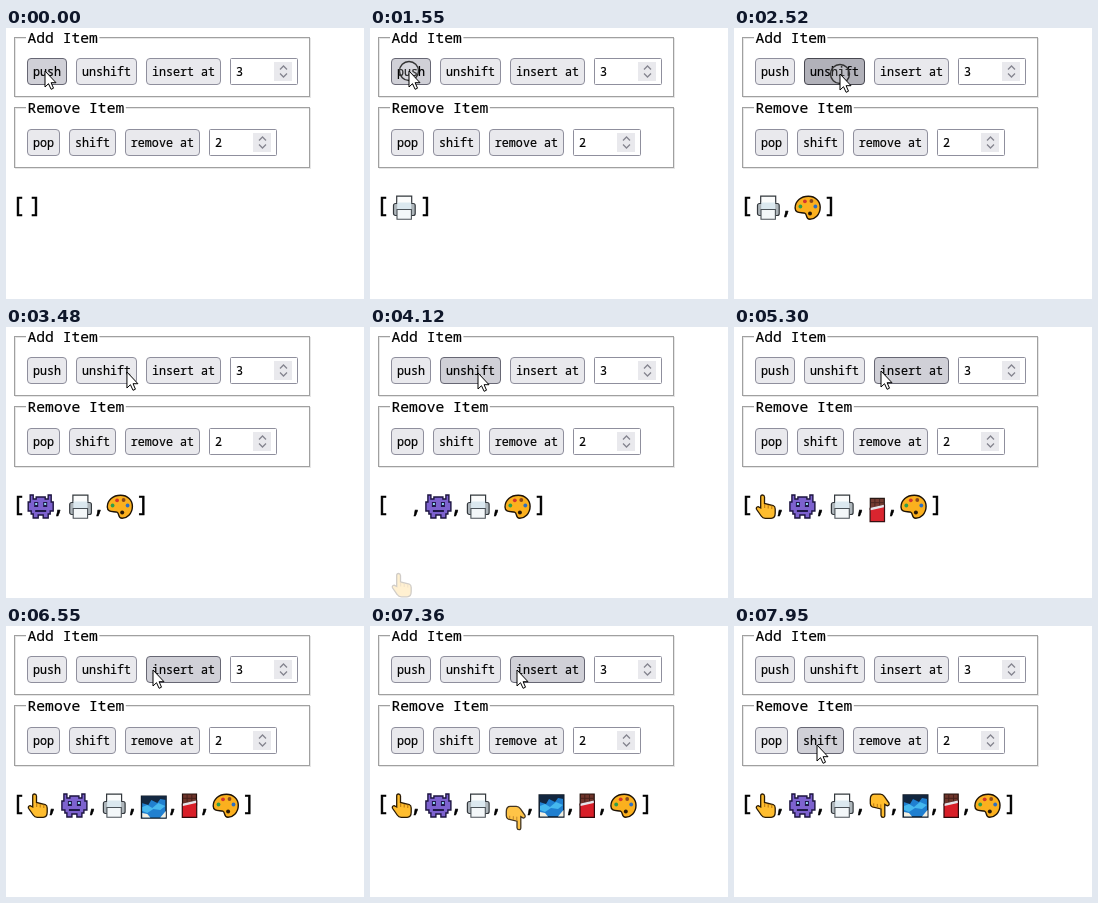
Animation of 358 by 271 pixels, one loop 8000 ms. Source, as an HTML page:

```html
<!DOCTYPE html>
<html lang="en">
<head>
<meta charset="utf-8">
<title>Array methods</title>
<style>
html, body { margin: 0; width: 100%; height: 100%; overflow: hidden; background: #fff; }
svg { display: block; }
text { font: 14.67px "Noto Sans Mono", monospace; fill: #000; stroke: #000; stroke-width: .2px; }
.small { font-size: 11.7px; }
.list text { font-size: 22px; stroke-width: .5px; }
.btn { fill: #e9e9ed; stroke: #8f8f9d; }
.btn.hover { fill: #d0d0d7; stroke: #676774; }
.btn.active { fill: #b1b1b9; stroke: #484851; }
</style>
</head>
<body>
<svg width="358" height="271" viewBox="0 0 358 271">
  <g id="form"></g>
  <g id="list" class="list"></g>
  <circle id="ring" r="9.5" fill="#fff" fill-opacity=".15" stroke="#333" stroke-width="1.4"/>
  <path id="cursor" d="M0 0V16L3.5 12.7 6.1 18.3 8.5 17.2 6.1 11.7H11Z" fill="#fff" stroke="#000"/>
</svg>
<script>
const LOOP = 8000, FLY = 400, CHAR = 13.2;
const $ = id => document.getElementById(id);

// Each icon: advance width and drawing
const hand = `<path d="M5.5 12V3Q5.5 1 7.3 1T9.3 3V9.5L18 11.5Q20 12.3 20 15V19Q20 24.3 16 24.3H10Q7.5 24.3 6 22L1.3 15.3Q.5 13 3 12.6L5.5 14Z"
  fill="#ffbd2e" stroke="#2a1a04" stroke-width="1.3"/><path d="M9.5 10V14M13 11V14.5M16.6 11.6V15" fill="none" stroke="#b87510"/>`;
const dot = (x, y, c, r = 1.9) => `<circle cx="${x}" cy="${y}" r="${r}" fill="${c}"/>`;
const icons = {
  up: [20.5, hand],
  down: [20.5, `<g transform="rotate(180 10.5 12.7)">${hand}</g>`],
  alien: [27, `<path d="M3 1H6V5H9V3H18V5H21V1H24V8H26V17H23V20H21V24H16V21H11V24H6V20H4V17H1V8H3Z"
    fill="#7d62cf" stroke="#1c1440" stroke-width="1.4"/>
    <path d="M7 8H11V13H7ZM16 8H20V13H16ZM8 16H19V18H8Z" fill="#1f1848"/>
    <path d="M8 9H10V11H8ZM17 9H19V11H17Z" fill="#8fd8f4"/>`],
  printer: [27, `<path d="M5.5 9V1.2H20.5V9" fill="#fbfcfc" stroke="#33383d" stroke-width="1.2"/>
    <rect x="2.3" y="8.5" width="21.7" height="12" rx="2" fill="#aeb6bb" stroke="#33383d" stroke-width="1.2"/>
    <path d="M6 7.5H20V15H6Z" fill="#dbe8ef"/>
    <path d="M5.8 14.5H20.2V24.3H5.8Z" fill="#f3f7f9" stroke="#4b5258" stroke-width="1.1"/>`],
  palette: [27, `<path d="M-.3 13C-.3 6 5.5 1.2 13 1.2 20 1.2 24.8 6 24.8 12.3 24.8 20 19 24.3 14.5 24.3 9.8 24.3 12.3 19.6 9.3 18.2 6.5 17-.3 19-.3 13Z"
    fill="#fbb01e" stroke="#1d1206" stroke-width="1.4"/>` + dot(5, 11.5, "#2f9e4b") + dot(9.5, 6.3, "#d4342e") +
    dot(16, 6, "#8a4a1c") + dot(20, 11.5, "#2f6fc0") + dot(14.6, 18.5, "#2b1a08", 2)],
  view: [27, `<path d="M.2 2H24.8V24H.2Z" fill="#1f7fd0" stroke="#0d1622" stroke-width="1.4"/>
    <path d="M.5 2H24.5V6L19 5 16 9 10 6 7 11 .5 9Z" fill="#12263f"/>
    <path d="M1 13 6 11 11 14 17 9 24 12 19 16 12 15 6 19 1 17Z" fill="#45b8ee"/>
    <path d="M1 19 6 20 9 23.5H1ZM19 23.5 24.5 17V23.5Z" fill="#f1eee0"/>`],
  bar: [18.8, `<path d="M1 1H15V12H1Z" fill="#6f352b" stroke="#20100c" stroke-width="1.2"/>
    <path d="M5.6 1.5V9M10.3 1.5V9M1.5 5.3H14.5" stroke="#45201a"/>
    <path d="M.8 11 15.2 8V24.3H.8Z" fill="#d81e28" stroke="#2f080b" stroke-width="1.2"/>
    <path d="M1.4 10.5 14.6 7.5V10L1.4 13Z" fill="#e4e4e8"/>`]
};

// Clicks: ring shown, button down, release, insert position, icon
const clicks = [
  [830, 900, 1050, 0, "printer"],
  [1550, 1600, 1760, 1, "palette"],
  [2520, 2520, 2710, 0, "alien"],
  [3860, 3860, 4090, 0, "up"],
  [4780, 4840, 5030, 3, "bar"],
  [6040, 6040, 6240, 3, "view"],
  [6930, 7000, 7160, 3, "down"]
];
// Pointer: time, x, y
const path = [
  [0, 39, 43], [2050, 39, 43], [2280, 106, 46], [3030, 106, 46], [3190, 145, 44], [3340, 145, 44],
  [3480, 121, 45], [3660, 108, 46], [4330, 108, 46], [4560, 143, 43], [4620, 147, 44],
  [7480, 147, 44], [7950, 83, 119], [8000, 83, 119]
];
// Hovered button from each time on
const hovers = [
  [0, "push"], [2120, ""], [2160, "unshift"], [3110, ""], [3170, "insert at"], [3400, ""],
  [3540, "unshift"], [4480, ""], [4530, "insert at"], [7590, ""], [7800, "shift"]
];

const label = (x, y, s, c = "") => `<text x="${x}" y="${y}" class="${c}">${s}</text>`;

function fieldset(top, bottom, title, names, value) {
  const frame = (d, c) => `<rect x="${8.5 + d}" y="${top + .5 + d}" width="295" height="${bottom - top - 1}" fill="none" stroke="${c}"/>`;
  const y = bottom - 39;
  let out = frame(1, "#e6e6e6") + frame(0, "#a0a0a0") +
    `<path d="M20 ${top - 1}h${title.length * 8.8 + 3}v4H20z" fill="#fff"/>` + label(21.5, top + 6, title);
  let x = 21;
  for (const name of names) {
    const w = name.length * 7.03 + 12;
    out += `<rect data-name="${name}" class="btn" x="${Math.round(x) + .5}" y="${y + .5}" width="${Math.round(w) - 1}" height="26" rx="3.5"/>` +
      label(x + 6, y + 18, name, "small");
    x += w + 8.8;
  }
  x = Math.round(x);
  return out + `<rect x="${x + .5}" y="${y + .5}" width="67" height="26" rx="1" fill="#fff" stroke="#8f8f9d"/>` +
    `<rect x="${x + 44}" y="${y + 4}" width="18" height="19" fill="#e9e9ed"/>` +
    `<path d="M${x + 50} ${y + 11.5}l3.5 -3.5 3.5 3.5m0 4l-3.5 3.5 -3.5 -3.5" fill="none" stroke="#85858f" stroke-width="1.3"/>` +
    label(x + 6, y + 18, value, "small");
}

function pointer(t) {
  const i = path.findIndex(k => k[0] > t), [t0, x0, y0] = path[i - 1], [t1, x1, y1] = path[i];
  const p = (t - t0) / (t1 - t0);
  return [x0 + (x1 - x0) * p, y0 + (y1 - y0) * p];
}

function listMarkup(t) {
  const items = [];
  for (const [, , end, at, name] of clicks)
    if (t >= end) items.splice(at, 0, [name, Math.min(1, (t - end) / FLY)]);
  let x = 8 + CHAR, out = label(5.7, 185, "[");
  items.forEach(([name, p], i) => {
    if (i) {
      out += label(x - 2.5, 185.5, ",");
      x += CHAR;
    }
    const [width, art] = icons[name], rest = (1 - p) ** 3;
    out += `<g transform="translate(${x} ${167 + 100 * rest})" opacity="${1 - rest}">${art}</g>`;
    x += width;
  });
  return out + label(x + 1.7, 185, "]");
}

$("form").innerHTML = fieldset(9, 69, "Add Item", ["push", "unshift", "insert at"], 3) +
  fieldset(79, 140, "Remove Item", ["pop", "shift", "remove at"], 2);
const buttons = document.querySelectorAll(".btn");

function draw(now) {
  const t = now % LOOP, at = `translate(${pointer(t).join(" ")})`;
  const hovered = hovers.findLast(h => h[0] <= t)[1];
  const click = clicks.find(c => t >= c[0] && t < c[2]);
  for (const b of buttons) {
    const on = b.dataset.name === hovered;
    b.classList.toggle("hover", on);
    b.classList.toggle("active", on && !!click && t >= click[1]);
  }
  $("list").innerHTML = listMarkup(t);
  $("cursor").setAttribute("transform", at);
  $("ring").setAttribute("transform", at);
  $("ring").setAttribute("visibility", click ? "visible" : "hidden");
}

const start = performance.now();
(function tick() {
  draw(performance.now() - start);
  requestAnimationFrame(tick);
})();
</script>
</body>
</html>
```
